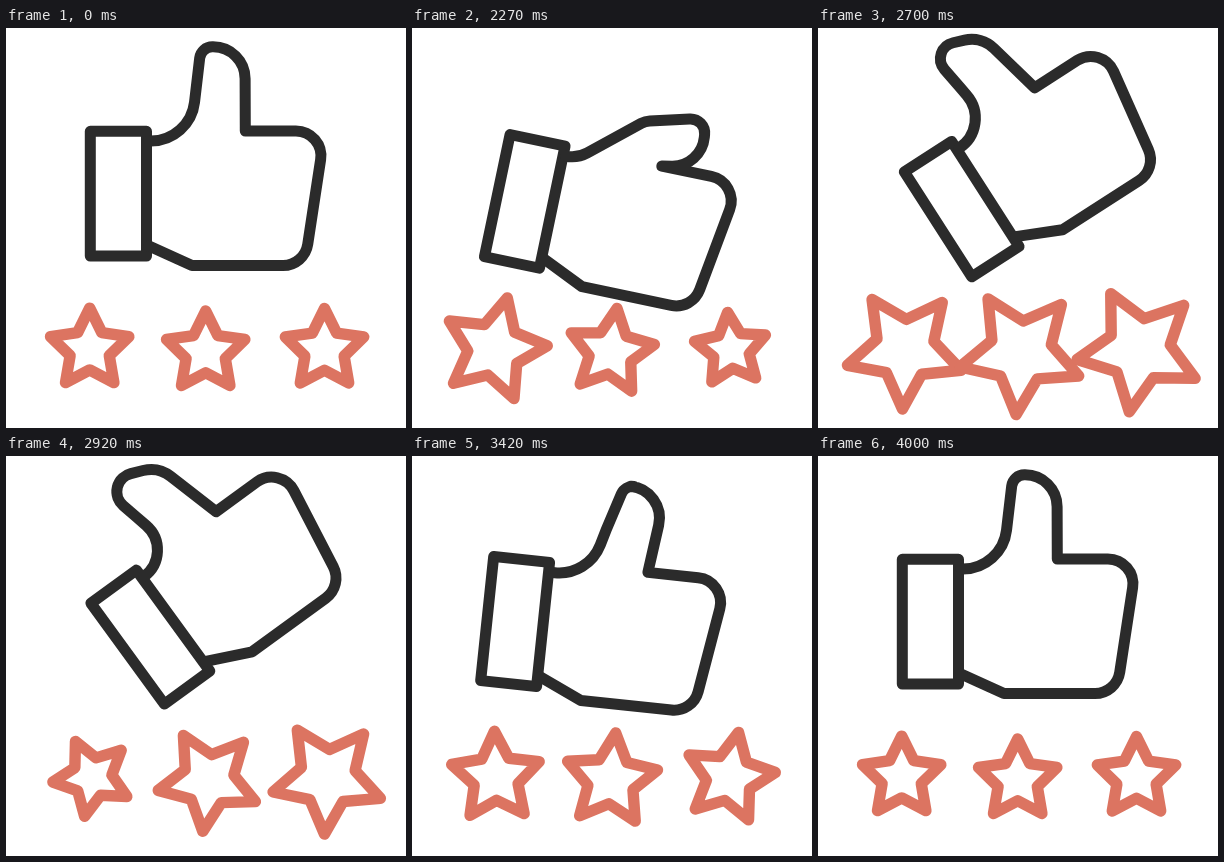
These frames come from a looping animation (400 px wide and 400 px high, 4.02 s). An HTML page with a canvas:

```html
<!DOCTYPE html>
<html lang="en">
<head>
<meta charset="utf-8">
<title>Thumbs up</title>
<style>
  html, body { margin: 0; width: 100%; height: 100%; overflow: hidden; background: #fff; }
  canvas { display: block; width: 100vw; height: 100vh; }
</style>
</head>
<body>
<canvas id="stage" width="400" height="400"></canvas>
<script>
const ctx = document.getElementById('stage').getContext('2d');
const LOOP = 4020, START = 2020, END = 4000;
const INK = '#2b2b2b', CORAL = '#dc7461';
const RAD = Math.PI / 180;

// time | hand angle, cuff centre x, y | thumb swing, length, tip tilt, tip width
const REST = [0, 112.3, 165.7, 0, 59.2, 0, 44];
const handKeys = [
  [2000, ...REST],
  [2260, 12, 112.5, 173, 84, 59, 84, 49],
  [2520, -24.2, 140.8, 180.8, -7, 57.5, 18, 49],
  [2890, -36.5, 144.7, 181.3, -26, 63.5, 22, 64],
  [3410, 6, 103, 165.5, 11, 60, 0, 42],
  [3780, ...REST]
];

// Turning points of a star: time, value
const spinKeys = [
  [2000, 0], [2100, -5.5], [2250, 15], [2470, -21.5], [2700, -33.5],
  [2920, -25], [3220, 12.5], [3510, -6], [3840, 0]
];
const sizeKeys = [
  [2000, 41.2], [2100, 37.3], [2270, 53], [2360, 59.3], [2580, 63],
  [2840, 51.5], [2960, 36.5], [3340, 47.5], [3600, 41.2]
];

const stars = [[83.7, 321.3], [199.7, 324.2], [318.5, 321.7]];
const STAR_LAG = 80;

// Smooth interpolation that never passes beyond its keys.
function sample(keys, t) {
  const last = keys.length - 1;
  if (t <= keys[0][0]) return keys[0].slice(1);
  if (t >= keys[last][0]) return keys[last].slice(1);
  let i = 0;
  while (keys[i + 1][0] <= t) i++;
  const h = keys[i + 1][0] - keys[i][0], u = (t - keys[i][0]) / h;
  const slope = (k, c) => (keys[k + 1][c] - keys[k][c]) / (keys[k + 1][0] - keys[k][0]);
  const tangent = (k, c) => {
    if (k === 0 || k === last) return 0;
    const a = slope(k - 1, c), b = slope(k, c);
    return a * b <= 0 ? 0 : 2 * a * b / (a + b);
  };
  return keys[i].slice(1).map((from, j) => {
    const c = j + 1, to = keys[i + 1][c], v = 1 - u;
    return from * (1 + 2 * u) * v * v + to * u * u * (3 - 2 * u)
      + h * u * v * (tangent(i, c) * v - tangent(i + 1, c) * u);
  });
}

// Polyline of [x, y, radius]; each radius is limited to the room it has.
function rounded(points) {
  ctx.beginPath();
  points.forEach(([x, y, r], i) => {
    if (!i) return ctx.moveTo(x, y);
    if (!r) return ctx.lineTo(x, y);
    const [ax, ay] = points[i - 1], [bx, by] = points[i + 1];
    const ux = x - ax, uy = y - ay, vx = bx - x, vy = by - y;
    const bend = Math.abs(Math.atan2(ux * vy - uy * vx, ux * vx + uy * vy));
    const k = Math.tan(bend / 2);
    if (k < 0.001) return ctx.lineTo(x, y);
    const room = Math.min(Math.hypot(ux, uy), Math.hypot(vx, vy));
    ctx.arcTo(x, y, bx, by, Math.min(r, room / k));
  });
  ctx.stroke();
}

// Corners of the thumb, from its base round to the front of its tip.
function thumb(swing, length, tilt, width) {
  const mx = 217 + length * Math.sin(swing * RAD);
  const my = 78 - length * Math.cos(swing * RAD);
  const dx = width / 2 * Math.cos(tilt * RAD), dy = width / 2 * Math.sin(tilt * RAD);
  const fold = Math.max(0, swing);
  const baseX = 184 - 0.35 * fold, backX = mx - dx, backY = my - dy;
  return [
    [baseX, 113, 44],
    [(baseX + backX) / 2, (113 + backY) / 2 - 0.21 * fold, 20],
    [backX, backY, 0.29 * width],
    [mx + dx, my + dy, 32]
  ];
}

function drawHand(t) {
  const [angle, cx, cy, ...pose] = sample(handKeys, t);
  ctx.save();
  ctx.strokeStyle = INK;
  ctx.lineWidth = 11;
  ctx.translate(cx, cy);
  ctx.rotate(angle * RAD);
  ctx.translate(-112.3, -165.7);
  ctx.strokeRect(84.3, 103.3, 56.2, 124.8);
  rounded([
    [143, 113, 0], ...thumb(...pose), [239.3, 103, 0],
    [319, 103, 25], [298.5, 237.5, 25], [186, 237.5, 0], [143, 218, 0]
  ]);
  ctx.restore();
}

function drawStar(x, y, t) {
  const [angle] = sample(spinKeys, t), [size] = sample(sizeKeys, t);
  const cx = x - 0.1 * angle;
  ctx.strokeStyle = CORAL;
  ctx.lineWidth = 11.4;
  ctx.beginPath();
  for (let i = 0; i < 10; i++) {
    const r = i % 2 ? size / 2 : size, a = (angle + i * 36) * RAD;
    ctx.lineTo(cx + r * Math.sin(a), y - r * Math.cos(a));
  }
  ctx.closePath();
  ctx.stroke();
}

function draw(now) {
  const loop = now % LOOP;
  const t = loop < START || loop >= END ? 0 : loop;
  ctx.fillStyle = '#fff';
  ctx.fillRect(0, 0, 400, 400);
  ctx.lineJoin = ctx.lineCap = 'round';
  drawHand(t);
  stars.forEach(([x, y], i) => drawStar(x, y, t - i * STAR_LAG));
}

const begin = performance.now();
function tick() {
  draw(performance.now() - begin);
  requestAnimationFrame(tick);
}
tick();
</script>
</body>
</html>
```
